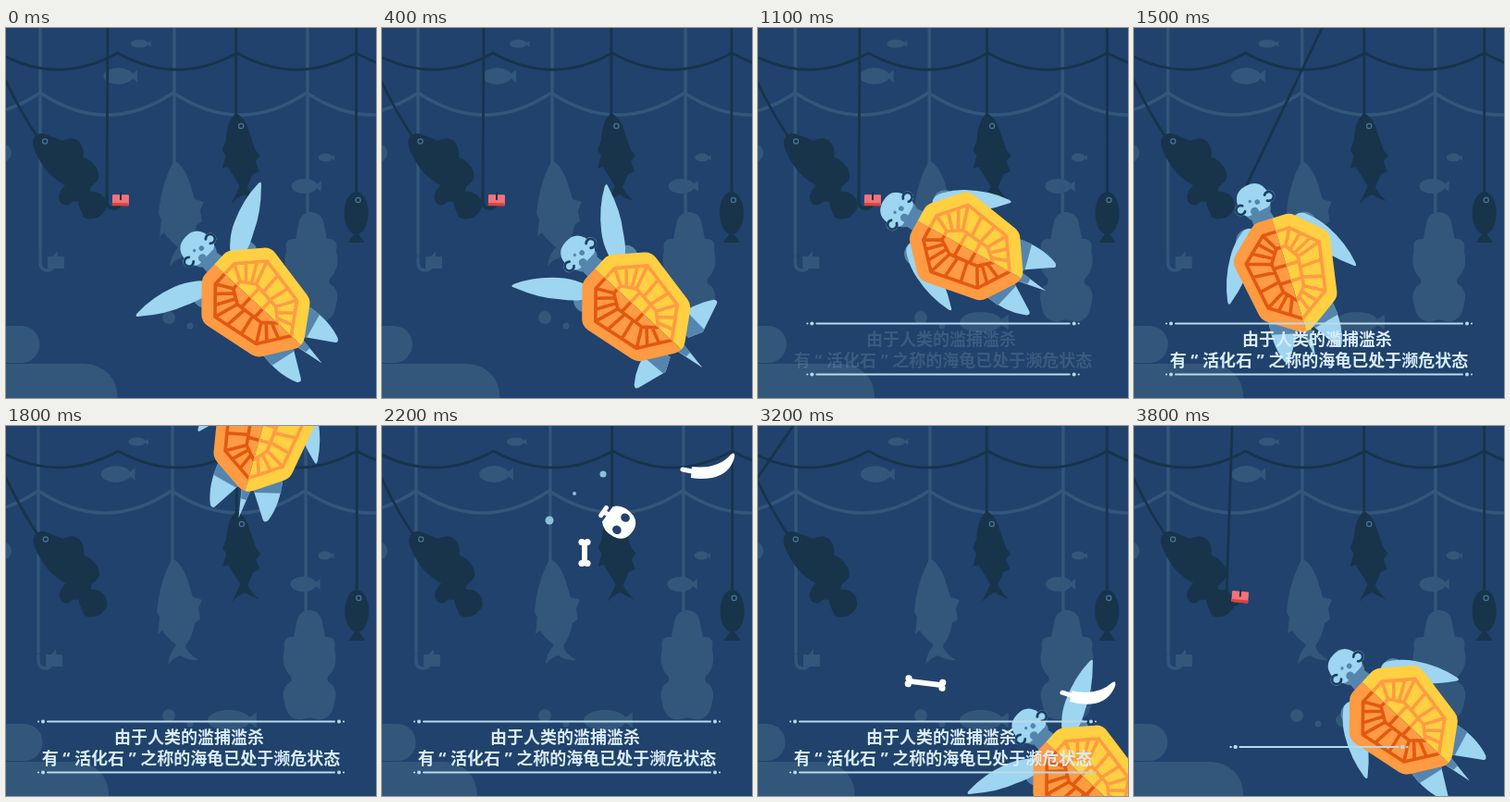
These frames come from a looping animation (400x400 px, 3.9 s). An HTML page with a canvas:

```html
<!DOCTYPE html>
<html lang="zh-CN">
<head>
<meta charset="utf-8">
<style>
  html, body { margin: 0; width: 100%; height: 100%; overflow: hidden; background: #20426c; }
  canvas { position: absolute; left: 0; top: 0; }
  #caption {
    position: absolute; left: 0; top: 325px; width: 400px; text-align: center; white-space: pre;
    font: 700 18px/23px "Noto Sans", "Noto Sans CJK SC", sans-serif; color: #d9edf8;
  }
  #caption span { position: relative; left: -2px; }
</style>
</head>
<body>
<canvas id="stage" width="400" height="400"></canvas>
<div id="caption"><span>由于人类的滥捕滥杀</span><br>有 “ 活化石 ” 之称的海龟已处于濒危状态</div>
<script>
const LOOP = 3900, STEP = 100, STROKE = 700, RAD = Math.PI / 180;
const SEA = '#20426c', BACK = '#33567b', FRONT = '#17344b', SKIN = '#9ed5f0', SHADE = '#5585ad',
  EYE = '#1c4066', YELLOW = '#ffd041', ORANGE = '#ff9b42', RUST = '#e2590f', RULE = '#b9d9ec';
const caption = document.getElementById('caption');
const c = document.getElementById('stage').getContext('2d');
c.lineCap = c.lineJoin = 'round';

const clamp = k => Math.max(0, Math.min(1, k));
const mix = (a, b, k) => a + (b - a) * k;
const wave = (t, peak, cycles) => Math.cos((t - peak) / LOOP * cycles * 2 * Math.PI);

// Keyframes: rows of [time, ...values], linear between rows.
function at(keys, t) {
  const i = Math.max(1, keys.findIndex(row => t <= row[0]));
  const a = keys[i - 1], b = keys[i];
  const k = clamp((t - a[0]) / (b[0] - a[0]));
  return a.slice(1).map((v, j) => mix(v, b[j + 1], k));
}

// One swimming stroke: reach forward, pull hard, recover.
const BEAT = [[0, 0, -27, 82], [.57, -.06, -55, 8], [.86, .76, 54, 82], [1, 1, -27, 82]];
// x, y, heading, head bend, front flipper angle, hind flipper angle
const CATCH = [[400, 275, 303, -47, 0, -55, 8], [700, 238, 260, -54, 0, 56, 82], [1100, 226, 238, -61, 0, 58, 82],
  [1500, 167, 264, -17, -9, 54, 82], [1600, 178, 240, 0, -4, 57, 82], [1950, 350, -170, 27, 0, 60, 82]];

function pose(t) {
  if (t > 400 && t < 2000) return at(CATCH, t);
  const beats = (t < 2000 ? t : t - LOOP) / STROKE, whole = Math.floor(beats);
  const [push, front, hind] = at(BEAT, beats - whole);
  const way = 86 * (whole + push);
  return [270 - way, 297 - way, -47, 0, front, hind];
}

function place(x, y, deg, draw) {
  c.save();
  c.translate(x, y);
  c.rotate(deg * RAD);
  draw();
  c.restore();
}
function mirrored(draw) {
  for (const side of [-1, 1]) {
    c.save();
    c.scale(side, 1);
    draw(side);
    c.restore();
  }
}
function fill(color, d) { c.fillStyle = color; c.fill(new Path2D(d)); }
function stroke(color, width, d) { c.strokeStyle = color; c.lineWidth = width; c.stroke(new Path2D(d)); }
function oval(color, x, y, rx, ry = rx) {
  c.fillStyle = color;
  c.beginPath();
  c.ellipse(x, y, rx, ry, 0, 0, 7);
  c.fill();
}
function box(color, x, y, w, h, r) {
  c.fillStyle = color;
  c.beginPath();
  c.roundRect(x, y, w, h, r);
  c.fill();
}
function arc(color, width, x, y, r, from = 0, to = 7) {
  c.strokeStyle = color;
  c.lineWidth = width;
  c.beginPath();
  c.arc(x, y, r, from, to);
  c.stroke();
}
function net(color, width, left, gap, y, sag) {
  let d = `M${left},${y}`;
  for (let x = left; x < 400; x += gap) d += `q${gap / 2},${sag * 2} ${gap},0`;
  stroke(color, width, d);
}

function smallFish(x, y, rx, ry) {
  oval(BACK, x, y, rx, ry);
  fill(BACK, `M${x + rx * .75},${y}l${rx * .55},${-ry * .75}v${ry * 1.5}z`);
}
const GROUPER = 'M-3,0Q4,-3 9,4L19,21Q33,24 33,35Q32,44 26,49Q31,56 30,68Q27,80 18,79Q12,78 9,83' +
  'Q18,89 17,99Q14,110 5,110Q-2,112 -8,107Q-16,103 -12,96Q-11,88 -8,84Q-12,78 -18,80Q-26,76 -22,68Q-18,62 -8,61' +
  'Q-13,50 -14,38Q-14,20 -10,9Q-8,2 -3,0Z';
const TUNA = 'M0,0Q8,4 12,14L21,40L26,46L21,52L25,63L18,66L12,80Q16,88 24,95Q16,93 9,88Q3,90 -5,98Q0,88 4,79' +
  'Q-4,66 -9,58L-15,60L-11,46L-15,40L-11,30Q-10,8 0,0Z';
const MARLIN = 'M0,0Q10,6 16,22L22,42L32,45L28,54L30,66L24,70Q22,84 14,95Q16,103 28,110' +
  'Q16,111 9,105Q1,107 -5,115Q-4,103 4,94Q-8,84 -11,78L-16,82L-14,64L-17,58Q-14,24 0,0Z';
const HALF_BASS = 'M-1,0Q12,0 14,14L17,29Q30,28 27,42Q32,60 20,72Q18,78 24,80Q31,88 27,100Q24,120 8,118L-1,116Z';

function hook(color) {
  stroke(color, 3.5, 'M0,0V6Q0,14 8,14Q15,14 15,4');
  if (color === BACK) {
    fill(BACK, 'M8,-1H14L19,-7V-1H26V12H8Z');
  } else {
    box('#f1727b', 6, -1, 18, 12, 1);
    box('#d9433f', 6, 8, 18, 3, 1);
    stroke(FRONT, 2, 'M15,-3V4');
  }
}

function backdrop(t, sway) {
  c.fillStyle = SEA;
  c.fillRect(0, 0, 400, 400);
  const drift = sway * 1.4;
  smallFish(120 + drift, 52, 16, 9);
  smallFish(143 + drift, 17, 9.5, 4.5);
  smallFish(322 + drift * .4, 171, 14, 8);
  smallFish(345 + drift * .2, 140, 7.5, 4.5);
  smallFish(241, 318, 23, 11);
  oval(BACK, -4, 135, 10);
  oval(BACK, 176, 313, 7);
  oval(BACK, 199, 322, 3.5);
  box(BACK, -40, 322, 78 - sway * 1.7, 40, 20);
  box(BACK, -60, 363, 174 + 15 * wave(t, 700, 1), 80, 35);
  place(sway, 0, 0, () => {
    net(BACK, 3.5, -108, 144, 70, 24);
    stroke(BACK, 3.5, 'M36,0V245M181,0V150M325,0V204');
    place(36, 248, 0, () => hook(BACK));
    place(181, 143, 0, () => fill(BACK, MARLIN));
    place(329, 199, 0, () => mirrored(() => fill(BACK, HALF_BASS)));
  });
}

function foreground(sway) {
  place(1 - sway * .35, 0, 0, () => {
    net(FRONT, 2.8, -9, 129, 27, 18);
    stroke(FRONT, 2.8, 'M248,0V96M378,0V182M-6,46Q12,86 34,119');
    place(32, 117, -38, () => fill(FRONT, GROUPER));
    place(248, 92, 0, () => fill(FRONT, TUNA));
    oval(FRONT, 378, 200, 13, 23);
    fill(FRONT, 'M378,219L387,232H369Z');
    for (const [x, y] of [[41.5, 122.5], [253.5, 106], [380, 186]]) arc('#4a7598', 1.2, x, y, 2.6);
  });
}

function fishingLine(t) {
  if (t > 1200 && t < 2000) {
    const [x, y, heading, bend] = pose(t), a = (heading + bend) * RAD;
    const mouthX = x + 104 * Math.sin(a), mouthY = y - 104 * Math.cos(a);
    const top = mix(110, mouthX + mouthY * .48, clamp((t - 1200) / 300));
    stroke(FRONT, 2.8, `M${top},0L${mouthX},${mouthY}`);
    return;
  }
  const swing = t < 2000 ? 0 : ((LOOP - t) / STROKE) ** 1.5;
  const top = 110 - 72 * swing, x = 109 - 164 * swing, y = 181 - 46 * swing;
  stroke(FRONT, 2.8, `M${top},0L${x},${y}`);
  place(x, y, (top - x) * .8, () => hook(FRONT));
}

const SHELL = [[-20, -61], [20, -61], [55, -29], [43, 41], [0, 70], [-43, 41], [-55, -29]];
const shell = new Path2D();
shell.moveTo(0, -61);
for (let i = 1; i <= 7; i++) shell.arcTo(...SHELL[i % 7], ...(i < 7 ? SHELL[(i + 1) % 7] : [0, -61]), 15);
shell.closePath();

// Scutes: a rim, a narrow inner ring, spokes between them and rungs across the spine.
const scutes = (() => {
  let rim = '', ring = '', spokes = '';
  SHELL.forEach(([x, y], i) => {
    const [nx, ny] = SHELL[(i + 1) % 7];
    rim += `${i ? 'L' : 'M'}${x * .75},${y * .75}`;
    ring += `${i ? 'L' : 'M'}${x * .27},${y * .46}`;
    for (const k of [0, .36, .7]) {
      const px = mix(x, nx, k), py = mix(y, ny, k);
      if (Math.abs(px) > 10) spokes += `M${px * .75},${py * .75}L${px * .27},${py * .46}`;
    }
  });
  return `${rim}Z${ring}Z${spokes}M-14,-8H14M-12,10H12`;
})();

function shellHalf(side, base, lines) {
  c.save();
  c.beginPath();
  c.rect(side < 0 ? -80 : 0, -80, 80, 160);
  c.clip();
  c.fillStyle = base;
  c.fill(shell);
  stroke(lines, 3.6, scutes);
  c.restore();
}

function head() {
  fill(SHADE, 'M-16,-80H16Q14,-70 11,-68L13,-50H-13L-11,-68Q-14,-70 -16,-80Z');
  fill(SKIN, 'M-18,-84Q-18,-104 0,-104Q18,-104 18,-84Q17,-74 11,-73H-11Q-17,-74 -18,-84Z');
  mirrored(() => {
    oval(SKIN, 17, -83, 6.5);
    arc(EYE, 2.8, 17, -83, 5, -2.4, 2.4);
  });
  oval(SHADE, -4, -87, 1.7);
  oval(SHADE, 3, -83, 2.8);
  oval(SHADE, -4, -75, 4.5);
}

function turtle(t) {
  const [x, y, heading, bend, front, hind] = pose(t);
  place(x, y, heading, () => {
    fill(SKIN, 'M-5,62L1,97L6,62Z');
    fill(SHADE, 'M-5,62L-2,76H4L6,62Z');
    mirrored(() => {
      oval(SHADE, 32, -45, 13);
      place(27, -51, front, () => fill(SKIN, 'M-6,0Q-6,-9 6,-11Q18,-14 30,-13Q56,-11 77,0Q82,3 76,4Q48,12 26,10Q-6,10 -6,0Z'));
      place(24, 53, hind, () => {
        fill(SKIN, 'M-8,-13Q20,-14 39,-3Q43,1 38,3L8,17L-8,12Z');
        fill(SHADE, 'M-8,-13L8,-13L11,15.5L8,17L-8,12Z');
      });
    });
    place(0, 0, bend, head);
    shellHalf(-1, ORANGE, RUST);
    shellHalf(1, YELLOW, ORANGE);
  });
}

function bone(length) {
  const h = length / 2 - 4;
  stroke('#fff', 6, `M0,${-h}V${h}`);
  for (const y of [-h, h]) for (const x of [-3, 3]) oval('#fff', x, y + Math.sign(y), 3.6);
}
function skull() {
  stroke('#fff', 5, 'M-12,0H-19M-20,-5V5');
  fill('#fff', 'M-15,-10Q-8,-18 4,-16Q18,-14 18,0Q18,14 4,16Q-8,18 -15,10Z');
  oval(SEA, 3, -8, 5, 4.5);
  oval(SEA, 3, 8, 5, 4.5);
}
function knife() {
  stroke('#fff', 5, 'M2,0L12,2');
  fill('#fff', 'M12,-3Q40,0 54,-16Q59,-20 58,-13Q53,5 34,9Q22,11 11,9Z');
}

function debris(t) {
  if (t < 1900) return;
  const s = (t - 2200) / 1000;
  if (t < 2700) for (const [x, y, r] of [[181, 102, 4.5], [239, 52, 3.5], [208, 73, 2]]) oval('#8fbfdb', x, y - 60 * s, r);
  place(256, 104 + 440 * s, 35 + 50 * s, skull);
  place(219, 137 + 560 * s, 60 * s, () => bone(29));
  place(181, -107 + 385 * s, 37 + 60 * s, () => bone(43));
  place(323 + 4 * s, 47 + 241 * s, 6 * s, knife);
}

function captionRules(t) {
  const grow = 1 - (1 - clamp((t - 700) / 600)) ** 2, shrink = 1 - clamp((t - 3500) / 400) ** 3;
  const reach = 165 * grow * shrink;
  const gap = 27.5 * clamp((t - 700) / 300) * clamp((3700 - t) / 200);
  if (reach > 10) for (const y of [347 - gap, 347 + gap]) {
    stroke(RULE, 2, `M${210 - reach},${y}H${190 + reach}`);
    for (const side of [-1, 1]) {
      oval(RULE, 200 + side * (reach - 5), y, 2);
      oval(RULE, 200 + side * reach, y, 1.1);
    }
  }
  caption.style.opacity = clamp((t - 1050) / 350) * clamp((3600 - t) / 150);
}

function render(now) {
  const t = Math.floor(now % LOOP / STEP) * STEP;
  const sway = 2.8 + 2.8 * wave(t, 900, 2) + 1.1 * wave(t, 3500, 1);
  backdrop(t, sway);
  foreground(sway);
  fishingLine(t);
  turtle(t);
  debris(t);
  captionRules(t);
}

let start;
function tick(now) {
  start ??= now;
  render(now - start);
  requestAnimationFrame(tick);
}
render(0);
requestAnimationFrame(tick);
</script>
</body>
</html>
```
